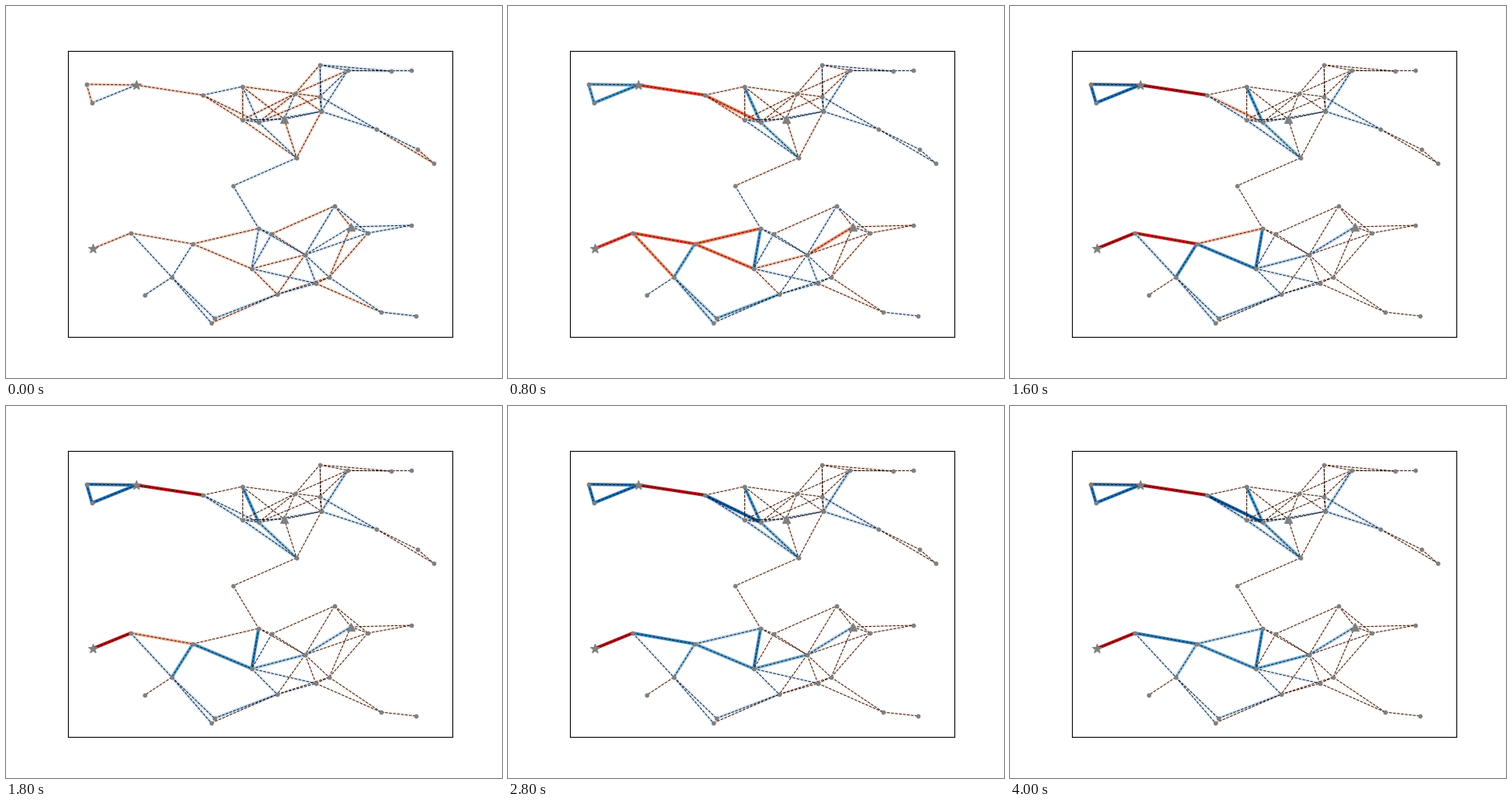
A matplotlib script for the animation above (4.2 s loop, 640 by 480 pixels).

```python
import numpy as np
import matplotlib.pyplot as plt
from matplotlib.animation import FuncAnimation
from matplotlib.collections import LineCollection

STEPS, STEP_MS = 21, 200

# Upper-case nodes form the upper network, lower-case ones the lower network.
NODES = {
    "A": (104, 101), "B": (111, 125), "S": (168, 102), "C": (254, 115),
    "D": (305, 104), "E": (305, 147), "F": (326, 150), "T": (359, 146),
    "G": (373, 113), "H": (405, 76), "I": (405, 117), "J": (407, 136),
    "K": (441, 83), "L": (497, 84), "M": (523, 83), "N": (478, 159),
    "O": (531, 185), "P": (552, 203), "Q": (375, 196), "R": (293, 232),
    "a": (326, 287), "b": (343, 294), "c": (424, 258), "t": (445, 285),
    "d": (467, 293), "e": (523, 283), "f": (386, 321), "g": (317, 339),
    "h": (241, 307), "i": (161, 293), "s": (112, 313), "j": (214, 350),
    "k": (179, 373), "l": (269, 403), "m": (265, 409), "n": (350, 372),
    "o": (400, 358), "p": (417, 350), "q": (484, 395), "r": (529, 400),
}

# Signed flow in percent (positive red, negative blue) at each key step;
# missing trailing values are zero.
KEY_STEPS = [2, 3, 6, 8, 11]
FLOWS = {
    "AS AB": (15, -45, -68, -70, -70),
    "BS": (-16, -52, -72, -73, -73),
    "SC si": (15, 48, 80, 80, 80),
    "ih": (12, 43, 80, 72, -66),
    "ha": (15, 48, 45, 22, -30),
    "hg": (15, 46, 43, -62, -52),
    "hj": (-12, -40, -62, -62, -36),
    "ij": (-12, 42, 22, -25, -9),
    "ag": (-20, -56, -66, -66, -63),
    "gf": (12, 40, -25, -28, -44),
    "ft": (-8, 42, 18, -27, -31),
    "CF": (12, 44, 46, 26, -80),
    "CE": (12, 12, 20, -16, -28),
    "DF": (-15, -50, -58, -58, -58),
    "FQ": (-15, -40, -34, -38, -43),
    "EQ": (12, -13, -18, -20, -26),
    "ln": (-20, -45, -34, -32, -18),
    "jl jm": (-16, -35, -25, -23, -9),
    "JK": (-15, -16, -23, -25, -30),
    "IN JN": (-16, -12, -13, -15, -20),
    "FJ EF": (-15, -14, -11, -12, -15),
    "go": (-16, -16, -12, -11, -8),
    "gn": (13, 13, -12, -12, -9),
    "bg": (-18, -16, -8, -6),
    "no": (-16, -14, -10, -5),
    "cf fo": (-18, -17, -5),
    "af HJ": (-18, -14, -3),
    "DE DG DT EG FG FI GI GJ GH GK TQ JQ bc pt pd oq ct": (14, 9),
    "HL KM KL NO IJ ab cd qr jk Ra fp TJ": (-14, -8),
    "QR CD HK IK td te de df pq TG ET HI": (-12, 8),
    "NP OP mn op np fn bf": (13, -8),
}
EDGES, KEYS = [], []
for names, flow in FLOWS.items():
    for name in names.split():
        EDGES.append([NODES[name[0]], NODES[name[1]]])
        KEYS.append(flow + (0,) * (len(KEY_STEPS) - len(flow)))


def flow_colors(flows):
    share = np.abs(flows) / 100
    return np.where((flows < 0)[:, None], plt.cm.Blues(share), plt.cm.Reds(share))


def draw_nodes(names, marker, size):
    x, y = zip(*(NODES[n] for n in names))
    ax.scatter(x, y, s=size, marker=marker, color="gray", linewidths=1, zorder=4)


fig, ax = plt.subplots(figsize=(6.4, 4.8), dpi=100)
ax.set(xlim=(80, 576), ylim=(427.2, 57.6), xticks=[], yticks=[])

bands = LineCollection(EDGES, linewidths=3, zorder=2)
dashes = LineCollection(EDGES, linewidths=0.7, linestyles="dashed", zorder=3)
ax.add_collection(bands, autolim=False)
ax.add_collection(dashes, autolim=False)
draw_nodes([n for n in NODES if n not in "SsTt"], "o", 10)
draw_nodes("Ss", "*", 75)
draw_nodes("Tt", "^", 50)


def update(step):
    flows = np.array([np.interp(step, KEY_STEPS, key) for key in KEYS])
    # Red bands lie below blue ones, strong bands above weak ones.
    order = np.lexsort((np.abs(flows), flows < 0))
    bands.set_segments([EDGES[i] for i in order])
    bands.set_color(flow_colors(flows[order]))
    dashes.set_color(["#061226" if v < 0 else "#260c04" for v in flows])
    return bands, dashes


anim = FuncAnimation(fig, update, frames=STEPS, interval=STEP_MS,
                     repeat=True, repeat_delay=0)
plt.show()
```
